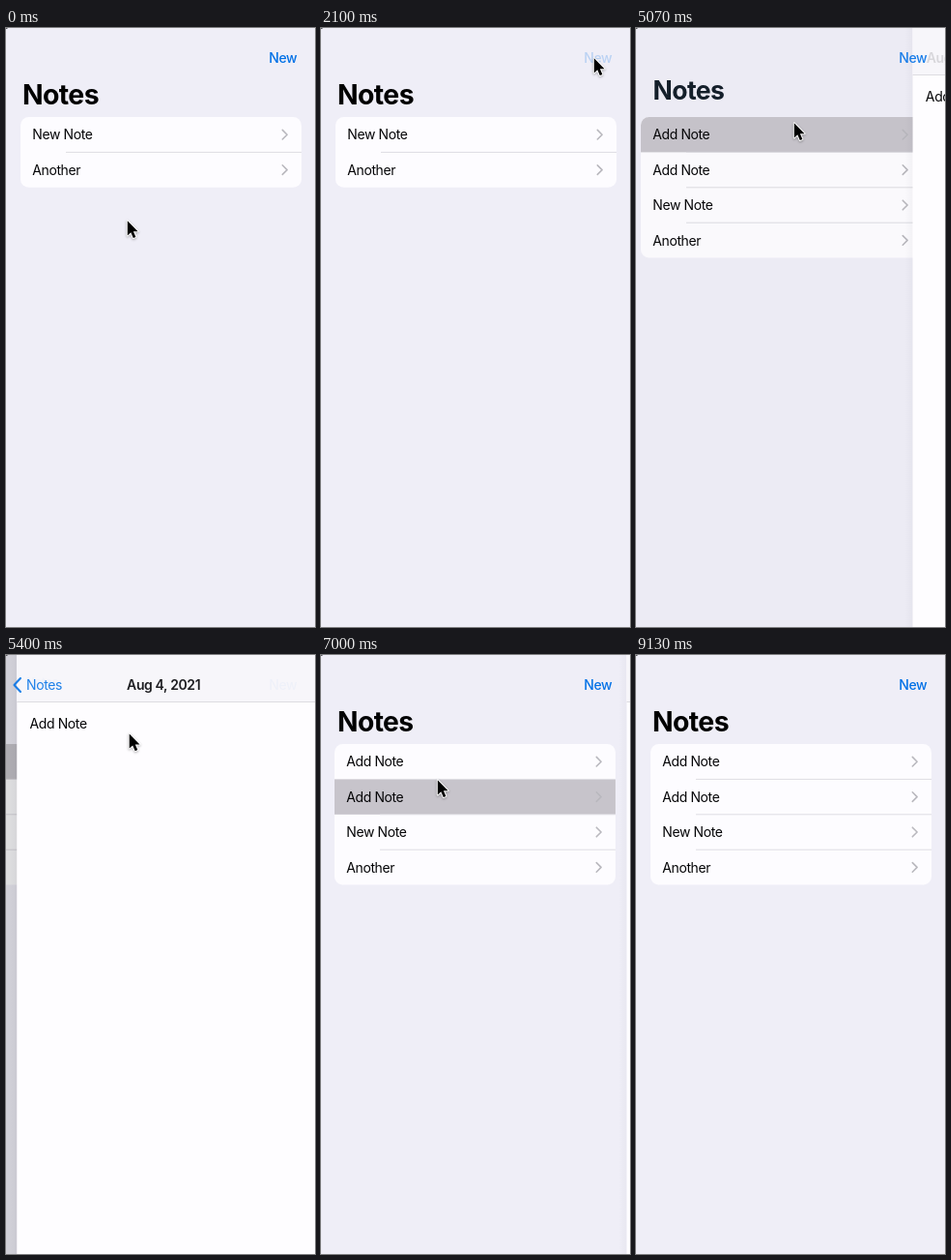
Write an HTML page with a canvas that moves like this. It is 320 px wide and 619 px high and loops after 9.23 s.

```html
<!DOCTYPE html>
<html lang="en">
<head>
<meta charset="utf-8">
<title>Notes</title>
<style>
html, body { margin: 0; width: 100%; height: 100%; overflow: hidden; background: #efeef7; }
canvas { display: block; width: 320px; height: 619px; }
</style>
</head>
<body>
<canvas id="stage"></canvas>
<script>
const W = 320, H = 619, LOOP = 9230;
const ROW = 36.4, TOP = 92, LEFT = 15, RIGHT = 306;
const BLUE = '0,112,230';
const canvas = document.getElementById('stage');
const ctx = canvas.getContext('2d');
const dpr = window.devicePixelRatio || 1;
canvas.width = W * dpr;
canvas.height = H * dpr;

const clamp = v => Math.max(0, Math.min(1, v));
const ramp = (t, a, b) => clamp((t - a) / (b - a));
const ease = v => v * v * (3 - 2 * v);
const smooth = (t, a, b) => ease(ramp(t, a, b));

// Critically damped spring from 0 to 1
function spring(t, start) {
  const x = Math.max(0, t - start) * 0.014;
  return 1 - (1 + x) * Math.exp(-x);
}

// Pointer stops: time, x, y
const path = [
  [630, 125, 198], [730, 127, 201], [870, 127, 201], [1230, 150, 351],
  [1310, 150, 351], [1780, 284, 21], [1950, 282, 30], [3060, 282, 30],
  [3640, 157, 248], [4060, 156, 372], [4250, 156, 372], [4600, 155, 221],
  [4830, 163, 97], [5130, 163, 97], [5860, 47, 43], [6230, 47, 43],
  [6800, 120, 128], [7080, 120, 128], [7580, 40, 31]
];

function pointerAt(t) {
  const i = path.findIndex(s => s[0] > t);
  if (i === 0) return path[0].slice(1);
  if (i < 0) return path[path.length - 1].slice(1);
  const [t0, x0, y0] = path[i - 1], [t1, x1, y1] = path[i];
  const k = smooth(t, t0, t1);
  return [x0 + (x1 - x0) * k, y0 + (y1 - y0) * k];
}

// Rubber-band pull that settles after release
function pull(t, start, release) {
  if (t < start) return 0;
  const drag = Math.max(0, pointerAt(Math.min(t, release))[1] - pointerAt(start)[1]);
  const stretch = H * (1 - 1 / (drag * 0.5 / H + 1));
  return stretch * (1 - spring(t, release));
}

// Navigation progress: 0 shows the list, 1 the note
function navAt(t) {
  const second = t >= 6900;
  const [press, push, pop] = second ? [6930, 6990, 7640] : [4970, 5032, 6003];
  const popping = t >= pop;
  let p = popping ? 1 - spring(t, pop) : spring(t, push);
  if (p < 0.003) p = 0;
  if (p > 0.997) p = 1;
  const glow = t < press ? 0 : popping ? p : smooth(t, press, press + 60);
  return { p, popping, glow, row: second ? 1 : 0 };
}

function text(str, x, y, size, color, weight = 400, spacing = -0.4) {
  ctx.font = `${weight} ${size}px Inter, Roboto, sans-serif`;
  ctx.letterSpacing = spacing + 'px';
  ctx.fillStyle = color;
  ctx.fillText(str, x, y);
}

function rect(x, y, w, h, color) {
  ctx.fillStyle = color;
  ctx.fillRect(x, y, w, h);
}

function chevron(x, y, dx, dy, color, width) {
  ctx.beginPath();
  ctx.moveTo(x, y - dy);
  ctx.lineTo(x + dx, y);
  ctx.lineTo(x, y + dy);
  ctx.strokeStyle = color;
  ctx.lineWidth = width;
  ctx.lineCap = ctx.lineJoin = 'round';
  ctx.stroke();
}

function drawRow(label, y, alpha) {
  ctx.globalAlpha = alpha;
  text(label, 27.3, y + 23.4, 14, '#060608');
  chevron(286.3, y + 18.2, 4.8, 4.8, '#b9b8be', 1.6);
  ctx.globalAlpha = 1;
}

function drawList(t, nav, offset) {
  const a = smooth(t, 2200, 2500), b = smooth(t, 2930, 3230);
  const lift = nav.popping ? 58 * clamp((nav.p - 0.466) / 0.534) * (nav.row ? 1 : 0.9) : 0;
  const top = TOP + offset - lift;
  const height = ROW * (2 + a + b);
  ctx.save();
  ctx.translate(-96 * nav.p, 0);
  ctx.beginPath();
  ctx.roundRect(LEFT, top, RIGHT - LEFT, height, 8.5);
  ctx.fillStyle = '#fdfcff';
  ctx.fill();
  ctx.clip();
  const rows = [
    ['Add Note', 0, b],
    ['Add Note', b, a],
    ['New Note', a + b, 1],
    ['Another', a + b + 1, 1]
  ];
  if (nav.glow > 0) {
    rect(LEFT, top + nav.row * ROW, RIGHT - LEFT, ROW, `rgba(199,196,203,${nav.glow})`);
  }
  for (const [label, pos, alpha] of rows) {
    if (alpha <= 0) continue;
    const y = top + pos * ROW;
    drawRow(label, y, alpha);
    if (label !== 'Another') rect(62, y + ROW - 0.5, RIGHT - 62, 1, `rgba(222,221,227,${alpha})`);
  }
  ctx.restore();
  if (nav.p > 0) rect(0, 0, W, H, `rgba(0,0,0,${0.13 * nav.p})`);
}

function drawTitle(p, offset) {
  const s = p > 0 ? 1 - 0.6 * p : 1 + 0.00068 * offset;
  const back = ramp(p, 0.72, 1);
  const alpha = (1 - 0.8 * p) * (1 - back);
  if (alpha > 0) {
    ctx.save();
    ctx.translate(17 + 4 * p, 69 - 43 * p + offset + 10.2 * s);
    ctx.scale(s, s);
    text('Notes', 0, 0, 28.4, `rgba(0,${112 * p},${230 * p},${alpha})`, 700, -0.6);
    ctx.restore();
  }
  if (back > 0) {
    const color = `rgba(${BLUE},${back})`;
    chevron(15, 31, -6.5, 7, color, 2.1);
    text('Notes', 21, 36, 14, color);
  }
}

function drawPanel(x) {
  const shade = ctx.createLinearGradient(x - 8, 0, x, 0);
  shade.addColorStop(0, 'rgba(0,0,30,0)');
  shade.addColorStop(1, 'rgba(0,0,30,0.03)');
  rect(x - 8, 0, 8, H, shade);
  rect(x, 0, W - x, H, '#fefdff');
  rect(x, 0, W - x, 48, '#f7f6fa');
  rect(x, 48, W - x, 1, '#dddce1');
  text('Add Note', x + 13.3, 76.4, 14, '#060608');
}

function drawDate(nav, x) {
  const left = 120.5 + x * (0.4 + 0.0008 * x);
  const alpha = clamp(nav.p * 1.35);
  let color = `rgba(30,30,34,${alpha})`;
  if (nav.popping && nav.p > 0.3) {
    const fade = ctx.createLinearGradient(246, 0, 272, 0);
    fade.addColorStop(0, color);
    fade.addColorStop(1, 'rgba(30,30,34,0)');
    color = fade;
  }
  text('Aug 4, 2021', left, 36, 14, color, 600);
}

function newAlpha(t) {
  const press = t < 2700 ? 2040 : 2790;
  const held = ramp(t, press, press + 20) * (1 - smooth(t, press + 110, press + 330));
  return 1 - 0.78 * held;
}

function drawPointer(x, y) {
  ctx.save();
  ctx.translate(x + 0.8, y + 1.2);
  ctx.beginPath();
  for (const [px, py] of [[0, 0], [0, 15.2], [3.5, 12], [6, 17.8], [8.6, 16.7], [6.1, 11], [10.8, 11]]) {
    ctx.lineTo(px, py);
  }
  ctx.closePath();
  ctx.shadowColor = 'rgba(0,0,0,0.3)';
  ctx.shadowBlur = 2.5 * dpr;
  ctx.shadowOffsetY = dpr;
  ctx.strokeStyle = '#fff';
  ctx.lineWidth = 2;
  ctx.lineJoin = 'round';
  ctx.stroke();
  ctx.shadowColor = 'transparent';
  ctx.fillStyle = '#000';
  ctx.fill();
  ctx.restore();
}

function draw(t) {
  ctx.setTransform(dpr, 0, 0, dpr, 0, 0);
  const nav = navAt(t);
  const offset = pull(t, 870, 1310) + pull(t, 3640, 4250);
  const x = W * (1 - nav.p);
  rect(0, 0, W, H, '#efeef7');
  drawList(t, nav, offset);
  if (nav.p > 0) drawPanel(x);
  drawTitle(nav.p, offset);
  if (nav.p > 0) drawDate(nav, x);
  text('New', 272.3, 36, 14, `rgba(${BLUE},${newAlpha(t) * (1 - nav.p)})`, 500);
  rect(0, 0, 1.5, 1, '#55555b');
  if (t < 7900) drawPointer(...pointerAt(t));
}

function tick(now) {
  draw(now % LOOP);
  requestAnimationFrame(tick);
}
draw(0);
requestAnimationFrame(tick);
</script>
</body>
</html>
```
